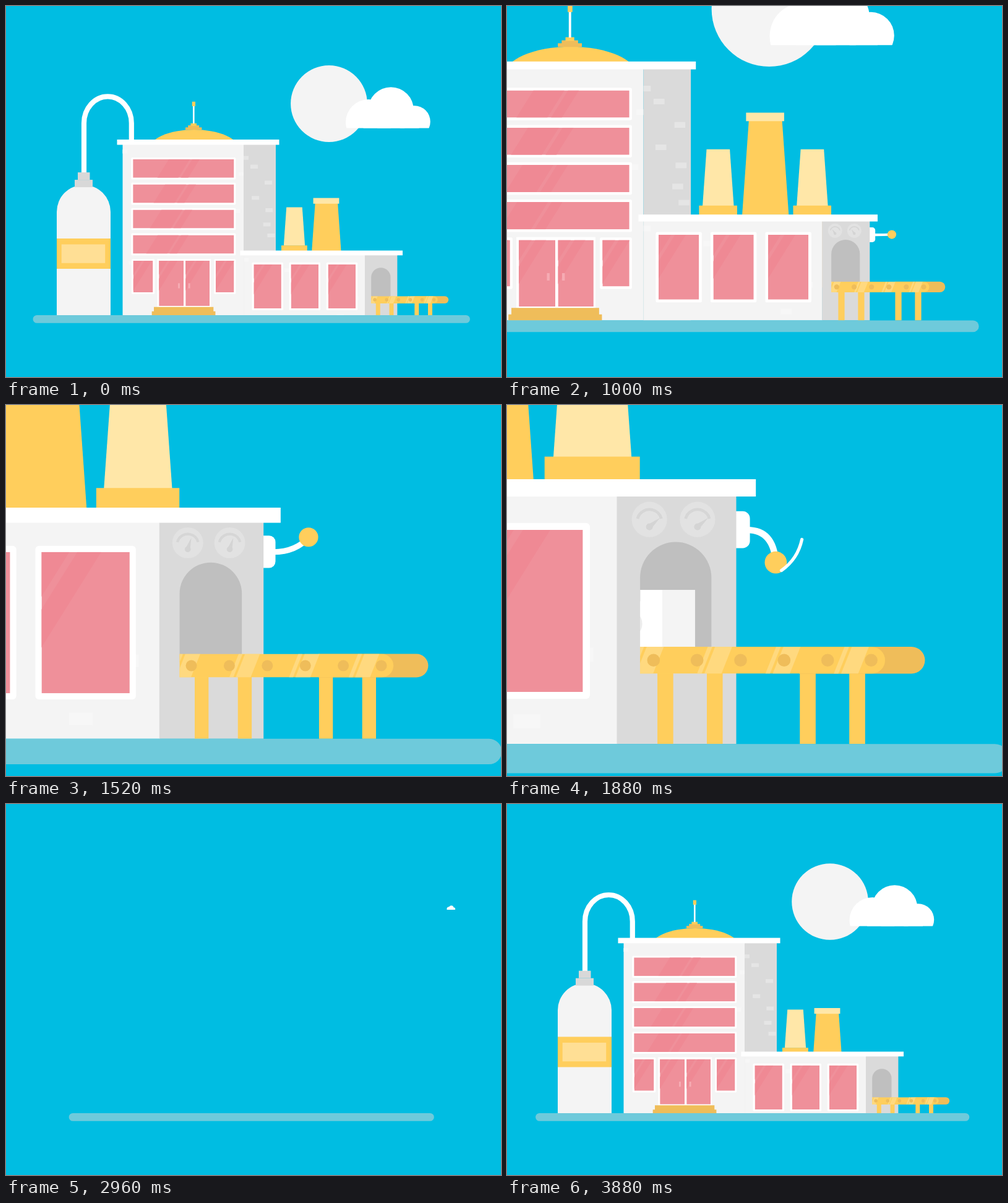
An HTML page with a canvas for the animation above (3920 ms loop, 800x600 px).

```html
<!DOCTYPE html>
<html lang="en">
<head>
<meta charset="utf-8">
<title>Factory</title>
<style>
html, body { margin: 0; width: 100%; height: 100%; overflow: hidden; background: #00bde2; }
canvas { display: block; width: 800px; height: 600px; }
</style>
</head>
<body>
<canvas id="stage" width="800" height="600"></canvas>
<script>
const ctx = document.getElementById('stage').getContext('2d');
const LOOP = 3920, CUT = 2795, GROUND = 500, BASE = 510;
const SKY = '#00bde2', WALL = '#f4f4f4', SIDE = '#dadada', WHITE = '#ffffff', PALE = '#f7f7f7';
const GOLD = '#ffce5c', CREAM = '#ffe7a8', OCHRE = '#efbd5a', STAMP = '#ededed';
const PINK = '#ef909a', ROSE = '#ef8994';

// ---- motion ----
const clamp = v => Math.max(0, Math.min(1, v));
const span = (t, start, length) => clamp((t - start) / length);
const cubicOut = u => 1 - (1 - u) ** 3;
const sineInOut = u => (1 - Math.cos(Math.PI * u)) / 2;
const move = (t, start, length, amount) => amount * sineInOut(span(t, start, length));

function bezierEase(u, x1, x2) {
  let lo = 0, hi = 1, p = u;
  for (let i = 0; i < 24; i++) {
    p = (lo + hi) / 2;
    const x = 3 * (1 - p) ** 2 * p * x1 + 3 * (1 - p) * p * p * x2 + p ** 3;
    if (x < u) lo = p; else hi = p;
  }
  return p * p * (3 - 2 * p);
}

// Grows to 1, then swings around it with decay.
function spring(t, start, rise, amp, period) {
  const u = t - start - rise;
  if (u < 0) return clamp((t - start) / rise);
  return 1 + amp * Math.exp(-0.0033 * u) * Math.sin(2 * Math.PI * u / period);
}

function seeded(seed) {
  return () => (seed = (seed * 16807) % 2147483647) / 2147483647;
}

// ---- shapes ----
function box(color, x, y, w, h, radius = 0) {
  ctx.fillStyle = color;
  ctx.beginPath();
  ctx.roundRect(x, y, w, h, radius);
  ctx.fill();
}
function disc(color, x, y, r) {
  ctx.fillStyle = color;
  ctx.beginPath();
  ctx.arc(x, y, Math.max(0, r), 0, 2 * Math.PI);
  ctx.fill();
}
function poly(color, ...xy) {
  ctx.fillStyle = color;
  ctx.beginPath();
  for (let i = 0; i < xy.length; i += 2) ctx.lineTo(xy[i], xy[i + 1]);
  ctx.closePath();
  ctx.fill();
}
// Symmetric upright shape, narrower at the top.
function taper(color, cx, y, h, topWidth, bottomWidth) {
  const a = topWidth / 2, b = bottomWidth / 2;
  poly(color, cx - a, y, cx + a, y, cx + b, y + h, cx - b, y + h);
}
function slant(color, x, y, w, h, lean) {
  poly(color, x, y, x + w, y, x + w - lean, y + h, x - lean, y + h);
}
function stroke(color, width, cap = 'butt') {
  ctx.strokeStyle = color;
  ctx.lineWidth = width;
  ctx.lineCap = cap;
  ctx.stroke();
}
function group(draw, dx = 0, dy = 0) {
  ctx.save();
  ctx.translate(dx, dy);
  draw();
  ctx.restore();
}
function clipBox(x, y, w, h, radius = 0) {
  ctx.beginPath();
  ctx.roundRect(x, y, w, h, radius);
  ctx.clip();
}

function bricks(color, x, y, w, h, count, seed) {
  const random = seeded(seed);
  group(() => {
    clipBox(x, y, w, h);
    for (let i = 0; i < count; i++)
      box(color, x + w * random() - 4, y + h * (i + random() / 2) / count, 12, 6.2);
  });
}

// Glass with two diagonal bands of shade.
function glass(x, y, w, h, shade = 0) {
  group(() => {
    clipBox(x, y, w, h);
    box(PINK, x, y, w, h);
    const lean = h / 1.6;
    slant(ROSE, x + shade - 20, y, 34, h, lean);
    slant(ROSE, x + shade + 18, y, 12, h, lean);
  });
}
function framed(x, y, w, h, pad, shade) {
  box(WHITE, x - pad, y - pad, w + 2 * pad, h + 2 * pad, 1.8);
  glass(x, y, w, h, shade);
}

// ---- sky ----
function drawCloud(left, scale) {
  if (scale <= 0) return;
  group(() => {
    ctx.scale(scale, scale);
    clipBox(-90, -90, 180, 119.5);
    disc(WHITE, -31.5, 20, 37);
    disc(WHITE, 4.5, 0, 36.8);
    disc(WHITE, 42.5, 19, 25.7);
    box(WHITE, -40, 15, 90, 20);
  }, left + 68.5, 168);
}

// ---- main building ----
function drawBottle() {
  ctx.beginPath();
  ctx.moveTo(126, 272);
  ctx.ellipse(164.4, 189, 38.4, 43, 0, Math.PI, 2 * Math.PI);
  ctx.lineTo(202.8, 218);
  stroke(WHITE, 8.2);
  box(WALL, 82, 289, 87, BASE - 289, [43.5, 43.5, 0, 0]);
  for (let i = 0; i < 2; i++) box('#d8d8d8', 116 - 5 * i, 268.7 + 12 * i, 19.5 + 9.5 * i, 12);
  box(GOLD, 82, 375.5, 87, 49);
  box('#ffdf95', 89.7, 385, 70.5, 30.3);
}

function drawDome() {
  ctx.fillStyle = GOLD;
  ctx.beginPath();
  ctx.ellipse(304, 231.3, 73, 32, 0, Math.PI, 2 * Math.PI);
  ctx.fill();
  for (let i = 0; i < 3; i++)
    box(i < 2 ? OCHRE : GOLD, 290 + 4.2 * i, 195.6 - 3.3 * i, 26.4 - 8.4 * i, 4);
  box(WHITE, 302, 160, 2.6, 29.3);
  box(GOLD, 300.8, 154, 5.2, 7.3);
}

function drawTower() {
  box(WALL, 188.5, 220, 195.5, BASE - 220);
  bricks(PALE, 188.5, 226, 195.5, 270, 9, 41);
  box(SIDE, 384, 220, 52, BASE - 220);
  bricks('#e5e5e5', 384, 232, 52, 155, 7, 7);
  box(WHITE, 179.5, 215.5, 262, 8.7);

  for (let i = 0; i < 4; i++) framed(205.2, 247.3 + 40.9 * i, 163.3, 30, 2.8, 78 - 6 * i);
  framed(205.7, 411.7, 31.8, 51, 2.8);
  framed(339, 411.7, 29.5, 51, 2.8);

  box(WHITE, 244.5, 408.5, 86.8, 78.5);
  for (let i = 0; i < 2; i++) {
    glass(247.2 + 43 * i, 411.7, 40 - i, 73);
    box('#f6abb3', 278 + 16.6 * i, 448, 3, 8.2);
    box(OCHRE, 239 - 3.3 * i, 486.3 + 7 * i, 96.3 + 6.4 * i, 8);
  }
}

// ---- wing ----
function drawSmallChimney(x) {
  taper(CREAM, x + 21, 312.1, 62, 25.5, 34.3);
  box(GOLD, x, 373.8, 41.8, 90);
}
function drawTallChimney() {
  taper(GOLD, 517.9, 279, 105, 36.3, 51.1);
  box(CREAM, 496.6, 271.8, 41.8, 9.3);
}

function drawLever(t) {
  const x = 638.3, y = 406;
  const degrees = move(t, 960, 280, -24) + move(t, 1740, 150, 76)
                + move(t, 2080, 340, -62) + move(t, 2420, 150, 10);
  const angle = degrees * Math.PI / 180;
  const knobX = x + 18.3 * Math.cos(angle), knobY = y + 18.3 * Math.sin(angle);
  const tail = 0.75 * Math.sin(Math.PI * span(t, 1790, 170));
  group(() => {
    ctx.beginPath();
    ctx.moveTo(x - 1, y);
    ctx.quadraticCurveTo(x + 10.5, y, knobX, knobY);
    stroke(WHITE, 2.8);
    disc(GOLD, knobX, knobY, 4.85);
    if (tail > 0.01) {
      ctx.beginPath();
      ctx.arc(x + 1, y - 0.5, 22.4, angle + 0.06 - tail, angle + 0.06);
      stroke(WHITE, 1.4, 'round');
    }
    box(WHITE, x - 10, 397.8, 10.1, 16.2, [0, 3.2, 3.2, 0]);
  }, -30 * (1 - cubicOut(span(t, 520, 350))));
}

function drawGauge(x, t, restAngle) {
  const scale = cubicOut(span(t, 760, 250));
  if (scale <= 0) return;
  const needle = move(t, 900, 380, 40) - 40 + move(t, 1280, 600, 50)
               + move(t, 1880, 600, restAngle - 50);
  group(() => {
    ctx.scale(scale, scale);
    disc('#e2e2e2', 0, 0, 7.75);
    ctx.beginPath();
    ctx.arc(0, 1, 5.4, 1.08 * Math.PI, 1.92 * Math.PI);
    stroke('#d6d6d6', 1.3);
    ctx.translate(0, 3.2);
    ctx.rotate(needle * Math.PI / 180);
    taper('#d4d4d4', 0, -6, 6, 0, 2.4);
    disc('#d4d4d4', 0, 0, 1.5);
  }, x, 401.4);
}

function drawParcel(right) {
  if (right < 590) return;
  group(() => {
    clipBox(590.2, 400, 310, 58);
    ctx.translate(right - 43.2, 432.3);
    box(WHITE, 0, 0, 29, 25.2);
    box(WALL, 28.85, 0, 14.35, 25.2);
    box(STAMP, 8.4, 0, 10.9, 5);
    ctx.translate(13.9, 14.9);
    ctx.beginPath();
    ctx.arc(0, 0, 5.4, 0, 2 * Math.PI);
    stroke(STAMP, 1.45);
    const star = [];
    for (let i = 0; i < 10; i++) {
      const a = Math.PI * (i / 5 - 0.5), r = i % 2 ? 1.6 : 3.3;
      star.push(r * Math.cos(a), r * Math.sin(a));
    }
    poly(STAMP, ...star);
  });
}

function drawConveyor() {
  const y = 457.3, h = 11.8, ends = [0, h / 2, h / 2, 0];
  for (let i = 0; i < 4; i++)
    box(GOLD, 597.8 + 62.5 * (i >> 1) + 21.7 * (i % 2), 465, 6.95, BASE - 465);
  box(OCHRE, 660, y, 55.2, h, ends);
  group(() => {
    clipBox(590.2, y, 107.5, h, ends);
    box(GOLD, 590, y, 108, h);
    for (let x = 593.1; x < 690; x += 30) {
      slant('#ffd97f', x, y, 7.5, h, 4.7);
      slant('#ffd97f', x - 3.2, y, 2, h, 4.7);
    }
  });
  for (let i = 0; i < 6; i++) disc(OCHRE, 596.1 + 19.1 * i, 463.2, 2.8);
}

function drawWing(t, build) {
  const rise = (depth, start, length) => depth - move(build, start, length, depth);
  group(() => drawSmallChimney(445), 0, rise(72, 3248, 740));
  group(drawTallChimney, 0, rise(113, 3620, 445));
  group(() => drawSmallChimney(548.3), 0, rise(72, 3920, 445));
  drawLever(t);

  box(WALL, 384, 386, 196.3, BASE - 386);
  bricks(PALE, 384, 392, 196, 105, 7, 19);
  box('#efefef', 384, 391, 0.5, BASE - 391);
  box(SIDE, 580, 386, 52.4, BASE - 386);
  for (let i = 0; i < 3; i++) framed(400.6 + 60.1 * i, 406, 44.3, 71.1, 3.1);
  box(WHITE, 378.5, 383.7, 262.5, 7.6);

  drawGauge(594.3, t, 10);
  drawGauge(615.4, t, 36);
  box('#bfbfbf', 590.2, 411.3, 31.3, 50, [15.65, 15.65, 0, 0]);
  drawParcel(590 + 0.0758 * (t - 1560));
  drawConveyor();
}

// ---- scene ----
function draw(now) {
  const time = now % LOOP;
  const fresh = time >= CUT;
  const build = fresh ? time : time + LOOP;
  const t = fresh ? 0 : time;

  ctx.setTransform(1, 0, 0, 1, 0, 0);
  box(SKY, 0, 0, 800, 600);

  // The camera zooms about a fixed point, then sweeps right.
  const zoom = 1 + 2.83 * bezierEase(span(t, 107, 2325), 0.7635, 0.2757);
  const sweep = 129 * (Math.max(0, t - 2120) / 360) ** 3;
  ctx.translate(730 - sweep, 482);
  ctx.scale(zoom, zoom);
  ctx.translate(-730, -482);

  disc(WALL, 522, 158, 63.3 * spring(build, 2990, 202, 0.25, 1000));
  drawCloud(652.5 - move(build, 2848, 1530, 130), cubicOut(span(build, 2950, 320)));

  group(() => {
    clipBox(-100, -100, 1100, GROUND + 100);
    group(() => {
      drawBottle();
      group(drawDome, 0, 62 * (1 - cubicOut(span(build, 3021, 1092))));
      drawTower();
    }, 0, 360 * (1 - cubicOut(span(build, 2977, 1051))));
    if (build > 3152) group(() => drawWing(t, build), 0, 116.3 - move(build, 3152, 970, 116.3));
  });

  const half = 355.5 * spring(build, CUT, 200, 0.5, 970);
  if (half > 0) box('#6ecadb', 396.7 - half, GROUND, 2 * half, 12.8, Math.min(6.4, half));
}

const began = performance.now();
function tick() {
  draw(performance.now() - began);
  requestAnimationFrame(tick);
}
tick();
</script>
</body>
</html>
```
